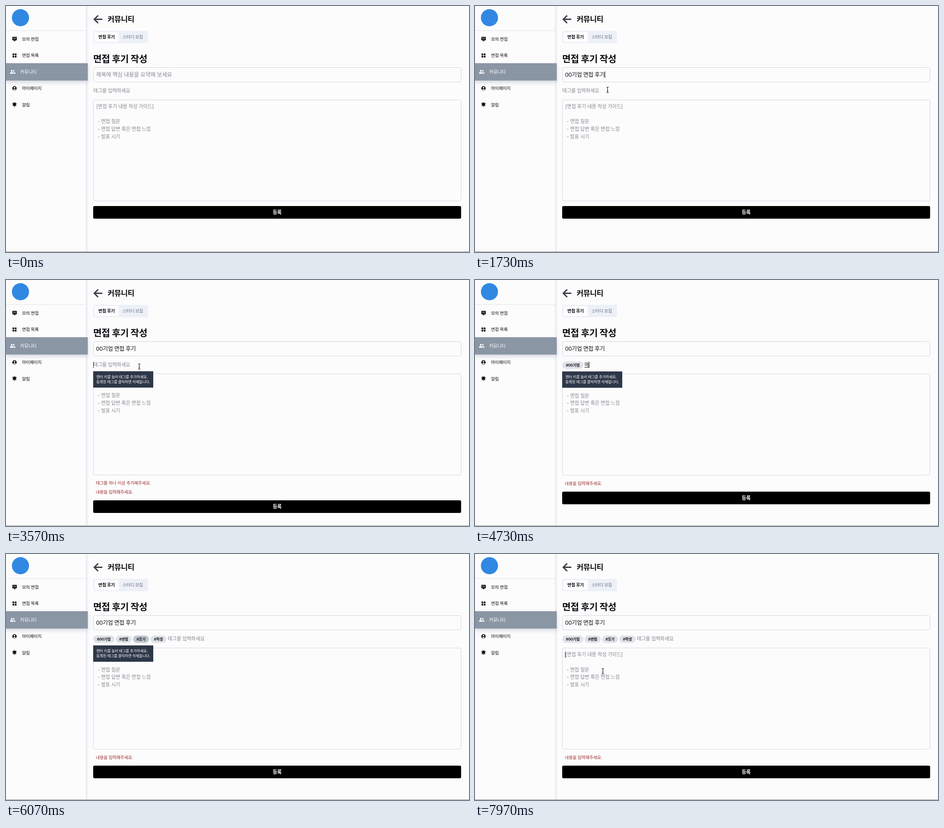
An HTML page that plays this animation: 1025 px wide and 546 px high, repeating every 8 s.

```html
<!DOCTYPE html>
<html lang="ko">
<head>
<meta charset="utf-8">
<title>커뮤니티</title>
<style>
html, body { margin: 0; width: 100%; height: 100%; overflow: hidden; background: #fcfcfd; }
svg { display: block; width: 1025px; height: 546px; }
text {
  font-family: Inter, "Noto Sans CJK KR", "Noto Sans CJK", sans-serif;
  font-size: 10.93px; letter-spacing: -.019em; white-space: pre; fill: #0b0b0f;
}
.tiny { font-size: 8.2px; }
.small { font-size: 9.57px; }
.field { font-size: 12.3px; }
.head { font-size: 16.4px; font-weight: 600; }
.title { font-size: 20.5px; font-weight: 700; }
.mid { font-weight: 500; }
.bold { font-weight: 600; }
.hint { fill: #86868f; }
.error { fill: #9b2c2c; }
.light { fill: #fff; }
.box { fill: none; stroke: #d3d4e2; }
.pill { fill: #dfe2e8; }
.pill.hover { fill: #c1c7d2; }
.lift { filter: drop-shadow(0 4px 5px rgba(60, 70, 110, .2)); }
.off { display: none; }
tspan { text-decoration: underline; }
</style>
</head>
<body>
<svg viewBox="0 0 1025 546">
  <!-- sidebar -->
  <defs>
    <linearGradient id="edge">
      <stop offset="0" stop-color="#e6e6f0"/>
      <stop offset="1" stop-color="#fcfcfd"/>
    </linearGradient>
  </defs>
  <rect x="177" width="6" height="545" fill="url(#edge)"/>
  <circle cx="32" cy="26" r="19" fill="#3188e2"/>
  <rect y="54" width="177" height="1" fill="#e3e4ec"/>
  <rect class="lift" y="127" width="181" height="38.5" fill="#8a96a4"/>
  <g class="icons" fill="#0b0b0f">
    <path d="M15 68.5h8a1 1 0 0 1 1 1v5.500a1 1 0 0 1-1 1h-3v1h1.500v1h-5v-1H18v-1h-3a1 1 0 0 1-1-1v-5.500a1 1 0 0 1 1-1z"/>
    <path d="M15.300 70h7.400v4h-7.400z" fill="#555"/>
    <path d="M14.500 105.500h3.700v3.700h-3.700zM19.500 105.500h3.700v3.700h-3.700zM14.500 110.500h3.700v3.700h-3.700zM19.500 110.500h3.700v3.700h-3.700z"/>
    <circle cx="18.800" cy="182.800" r="4.800"/>
    <circle cx="18.800" cy="181.200" r="1.700" fill="#fcfcfd"/>
    <path d="M15.600 185.300a3.700 2.300 0 0 1 6.400 0a4 4 0 0 1-6.400 0z" fill="#fcfcfd"/>
    <path d="M18.800 214.200c2.200 0 3.300 1.600 3.300 3.600 0 2 .4 2.700 1.300 3.800h-9.200c.9-1.100 1.300-1.800 1.300-3.800 0-2 1.100-3.600 3.300-3.600zM17.300 222.300h3a1.500 1.500 0 0 1-3 0z"/>
    <path d="M14.200 218a5 5 0 0 1 2-3.600M23.400 218a5 5 0 0 0-2-3.600" fill="none" stroke="#0b0b0f" stroke-width=".9"/>
  </g>
  <g fill="#fff">
    <circle cx="12.800" cy="143.900" r="2"/><circle cx="17.300" cy="143.900" r="1.700"/>
    <path d="M8.800 150.300v-1.200c0-3 8-3 8 0v1.200zM17.600 150.300v-1.300c0-.9-.4-1.500-1-2 2-.2 4.400.5 4.400 2.100v1.200z"/>
  </g>
  <g class="mid">
    <text class="small" x="35.500" y="76.500">모의 면접</text>
    <text class="small" x="35.500" y="113">면접 목록</text>
    <text class="light" style="font-size:10.1px;font-weight:400" x="31.300" y="149.700">커뮤니티</text>
    <text class="small" x="35.500" y="186">마이페이지</text>
    <text class="small" x="35.500" y="222.500">알림</text>
  </g>

  <!-- header and tabs -->
  <path d="M213.300 29.500H196.500M204 21l-8.500 8.500 8.500 8.500" fill="none" stroke="#3f4048" stroke-width="3.100"/>
  <text class="head" x="225" y="35.400">커뮤니티</text>
  <rect x="193" y="55" width="121.500" height="27.500" rx="4" fill="#edf1f7"/>
  <rect x="196" y="58" width="53.500" height="22" rx="3" fill="#fdfdfe"/>
  <text class="small bold" x="204.300" y="72.400">면접 후기</text>
  <text class="small mid" x="258" y="72.400" fill="#64697c" style="fill:#64697c">스터디 모집</text>

  <!-- form -->
  <text class="title" x="193" y="125.200">면접 후기 작성</text>
  <rect class="box" x="193.500" y="136.500" width="814" height="32" rx="4"/>
  <text class="field hint" id="titleHint" x="199.300" y="157">제목에 핵심 내용을 요약해 보세요</text>
  <text class="field" id="titleText" x="199.300" y="157"></text>

  <g id="pills"></g>
  <text class="hint" id="tagHint" y="192">태그를 입력하세요</text>
  <text id="tagText" y="192"></text>

  <g id="area">
    <rect class="box" x="193.500" y="208.300" width="814" height="224.400" rx="4"/>
    <g id="guide">
      <text class="hint" x="199.800" y="226.700">[면접 후기 내용 작성 가이드]</text>
      <text class="hint" x="202.800" y="260.200">- 면접 질문</text>
      <text class="hint" x="202.800" y="277">- 면접 답변 혹은 면접 느낌</text>
      <text class="hint" x="202.800" y="293.800">- 발표 시기</text>
    </g>
    <g id="tip">
      <rect x="193" y="202.500" width="133" height="36.300" fill="#2d3748"/>
      <text class="tiny mid light" x="200" y="217.600">엔터 키를 눌러 태그를 추가하세요.</text>
      <text class="tiny mid light" x="200" y="229">등록된 태그를 클릭하면 삭제됩니다.</text>
    </g>
  </g>
  <text class="small error" id="tagError" x="198.800" y="454.400">태그를 하나 이상 추가해주세요.</text>
  <text class="small error" id="bodyError" x="198.800">내용을 입력해주세요.</text>
  <g id="submit">
    <rect x="193" width="814.500" height="28" rx="3" fill="#000"/>
    <text class="bold light" x="600.300" y="18" text-anchor="middle">등록</text>
  </g>
  <rect y="545" width="1025" height="1" fill="#8c8c8c"/>

  <rect id="caret" width="1" fill="#111"/>
  <path id="beam" d="M-2.500-6Q0-6 0-4.500Q0-6 2.500-6M0-4.500V4.500M-2.500 6Q0 6 0 4.500Q0 6 2.500 6M-1.300 2h2.600" fill="none" stroke="#111" stroke-width="1.100"/>
  <path id="arrow" d="M0 0V10.200l2.300-2.100 1.700 3.800 1.700-.8-1.700-3.600h3.200z" fill="#000" stroke="#fff" stroke-width=".7"/>
</svg>
<script>
const LOOP = 8000;
const SUBMIT = 2250, TAG_FOCUS = 3300, AREA_FOCUS = 7600;
const el = id => document.getElementById(id);
const show = (id, on) => el(id).classList.toggle('off', !on);

// Keystroke stages of each word in the Korean input method
const ime = {
  기업: 'ㄱ,기,깅,기어,기업',
  면접: 'ㅁ,며,면,멵,면저,면접',
  후기: 'ㅎ,후,훅,후기',
  작성: 'ㅈ,자,작,잓,작서,작성'
};

function spell(phrase) {
  const steps = [];
  let done = '';
  for (const part of phrase.match(/기업|면접|후기|작성|./g)) {
    for (const s of (ime[part] || part).split(',')) steps.push(done + s);
    done += part;
  }
  return steps;
}

function typing(phrase, start, gap) {
  const steps = spell(phrase);
  return { phrase, start, gap, steps, end: start + steps.length * gap };
}

function typedAt(job, t) {
  const i = Math.floor((t - job.start) / job.gap);
  return i < 0 ? '' : job.steps[Math.min(i, job.steps.length - 1)];
}

const title = typing('00기업 면접 후기', 150, 70);
const tags = [
  typing('00기업', 3700, 95),
  typing('면접', 4660, 52),
  typing('후기', 5040, 50),
  typing('작성', 5290, 42)
];
const pillX = [193, 242.8, 281.2, 319.7];
const pillW = [46.8, 35.4, 35.4, 35.4];
const inputX = [193.3, 242.5, 281, 319.5, 358];

el('pills').innerHTML = tags.map((tag, i) =>
  `<g><rect class="pill" x="${pillX[i]}" y="181" width="${pillW[i]}" height="16.200" rx="8.100"/>
   <text class="tiny bold" x="${pillX[i] + pillW[i] / 2}" y="192" text-anchor="middle">#${tag.phrase}</text></g>`).join('');
const pills = [...el('pills').children];

// Pointer runs: [time, x, y]
const runs = [
  { until: 3700, keys: [[1600, 291, 154], [1730, 293.5, 186], [2150, 589, 464], [2400, 587.5, 465], [2680, 587.5, 465], [3200, 295, 192]] },
  { until: LOOP, keys: [[6850, 295, 190], [7500, 283, 260]] }
];

function pointerAt(t) {
  const run = runs.find(r => t >= r.keys[0][0] && t < r.until);
  if (!run) return null;
  const next = run.keys.findIndex(k => k[0] > t);
  if (next < 0) return run.keys[run.keys.length - 1].slice(1);
  const a = run.keys[next - 1], b = run.keys[next];
  const u = (t - a[0]) / (b[0] - a[0]);
  const e = u * u * (3 - 2 * u);
  return [a[1] + (b[1] - a[1]) * e, a[2] + (b[2] - a[2]) * e];
}

function setText(id, value, composing) {
  const node = el(id);
  const live = composing && /[ㄱ-ㅎ가-힣]$/.test(value);
  node.textContent = live ? value.slice(0, -1) : value;
  if (live) {
    const last = document.createElementNS('http://www.w3.org/2000/svg', 'tspan');
    last.textContent = value.slice(-1);
    node.append(last);
  }
  return value ? node.getComputedTextLength() : 0;
}

function drawCaret(x, y, h, t, since) {
  const on = t >= since && (t - since) % 1000 < 500;
  show('caret', on);
  el('caret').setAttribute('x', x);
  el('caret').setAttribute('y', y);
  el('caret').setAttribute('height', h);
}

const lastKey = (job, t) =>
  job.start + job.gap * Math.min(job.steps.length, Math.floor((t - job.start) / job.gap));

function render(t) {
  const heading = typedAt(title, t);
  const headingW = setText('titleText', heading, t < title.end + 60);
  show('titleHint', !heading);

  const count = tags.filter(tag => t >= tag.end).length;
  const current = tags[count];
  const draft = current ? typedAt(current, t) : '';
  const x = inputX[count];
  el('tagText').setAttribute('x', x);
  el('tagHint').setAttribute('x', x);
  const draftW = setText('tagText', draft, true);
  show('tagHint', !draft);

  const pointer = pointerAt(t);
  const hovering = t < 6850 || (pointer && pointer[1] < 197);
  pills.forEach((pill, i) => {
    pill.classList.toggle('off', i >= count);
    pill.firstElementChild.classList.toggle('hover', i === 2 && hovering);
  });

  const tagFocus = t >= TAG_FOCUS && t < AREA_FOCUS;
  show('tip', tagFocus);
  el('area').setAttribute('transform', `translate(0 ${count ? .4 : 0})`);
  el('guide').firstElementChild.classList.toggle('off', tagFocus);

  const failed = t >= SUBMIT;
  show('tagError', failed && !count);
  show('bodyError', failed);
  el('bodyError').setAttribute('y', count ? 454.7 : 474);
  el('submit').setAttribute('transform', `translate(0 ${!failed ? 444 : count ? 469.8 : 489})`);

  if (t < SUBMIT) {
    drawCaret(199.3 + headingW, 145.5, 14.5, t, t < title.start ? title.start : lastKey(title, t));
  } else if (tagFocus) {
    const job = draft ? current : tags[count - 1];
    drawCaret(x + draftW, 181.5, 13.5, t, job ? lastKey(job, t) : TAG_FOCUS);
  } else {
    drawCaret(199.5, 216.5, 13.5, t, t < AREA_FOCUS ? LOOP : AREA_FOCUS);
  }

  const overText = pointer && pointer[1] < 433;
  show('beam', overText);
  show('arrow', pointer && !overText);
  if (pointer) {
    el(overText ? 'beam' : 'arrow').setAttribute('transform', `translate(${pointer[0]} ${pointer[1]})`);
  }
}

const origin = performance.now();
function tick() {
  render((performance.now() - origin) % LOOP);
  requestAnimationFrame(tick);
}
tick();
</script>
</body>
</html>
```
